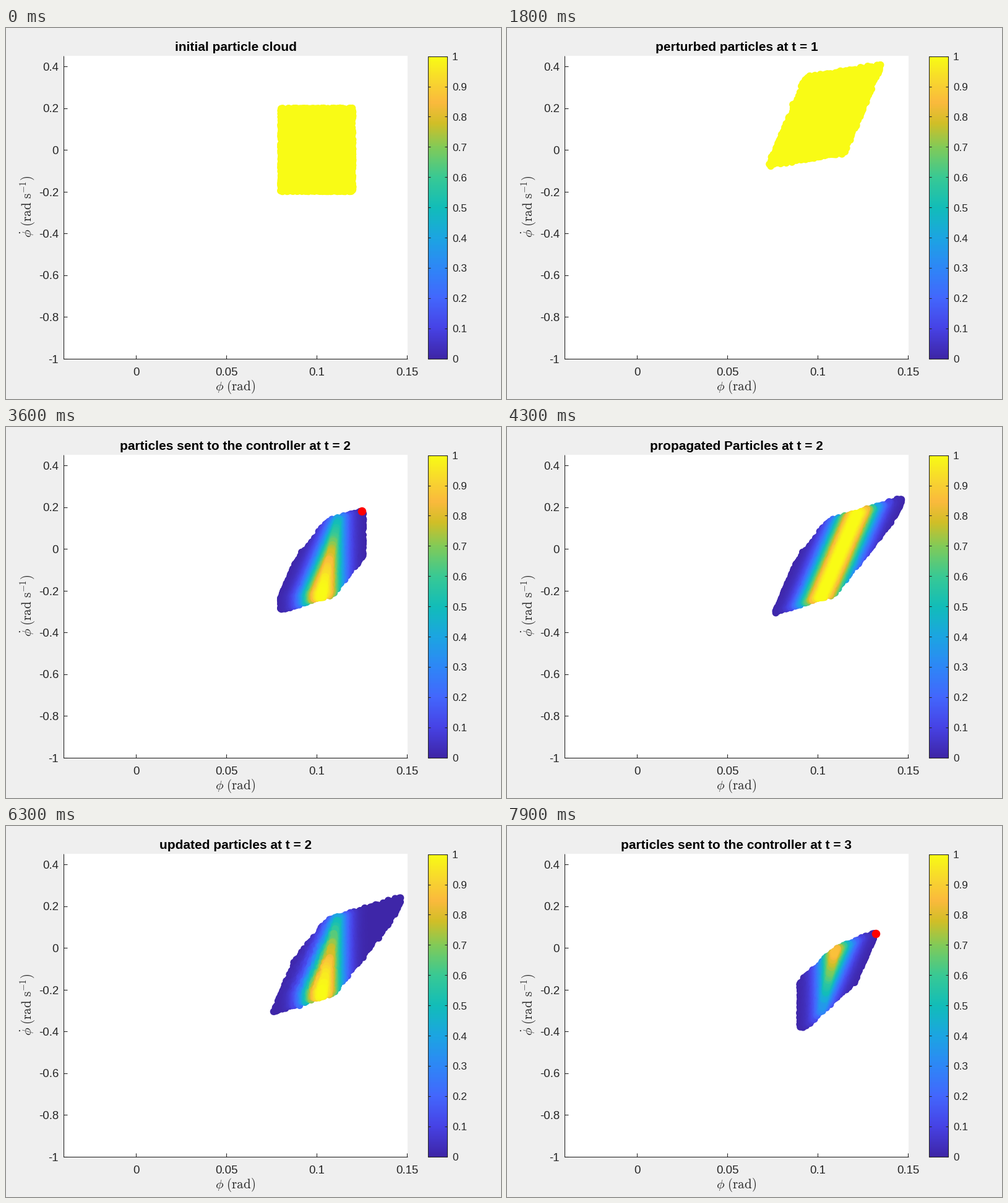
These frames come from a looping animation (800 px wide and 600 px high, 8000 ms). A matplotlib script:

```python
import numpy as np
import matplotlib.pyplot as plt
from matplotlib.animation import FuncAnimation
from matplotlib.colors import LinearSegmentedColormap
from matplotlib.patches import Rectangle

plt.rcParams["font.family"] = "Liberation Sans"
plt.rcParams["mathtext.fontset"] = "cm"

W, H, DPI = 800, 600, 100
LEFT, RIGHT, TOP, BOTTOM = 93, 648.5, 45, 534.6
BAR_LEFT, BAR_RIGHT, BAR_TOP = 682.4, 713.4, 45.6
INK = "#262626"
PARULA = LinearSegmentedColormap.from_list("parula", [
    (0, "#3e26a8"), (.1, "#4743e6"), (.2, "#4367fd"), (.3, "#2e87f7"),
    (.4, "#1ca5e2"), (.5, "#12bdb9"), (.6, "#38c995"), (.7, "#81cb59"),
    (.78, "#d1bf27"), (.85, "#fbba3d"), (.92, "#f8d62f"), (1, "#f9fb15")])


def pt(px):
    return px * 72 / DPI


def to_px(phi, rate):
    return 210 + 2923 * phi, 197 - 337.5 * rate


# Particle filter, with positions kept in stage pixels
rng = np.random.default_rng(4)


def propagate(pos, shift):
    return pos @ np.array([[1.03, -.17], [-.45, 1.05]]) + shift


def perturb(pos):
    return pos + rng.normal(0, 1.1, pos.shape)


def likelihood(pos, center):
    return np.exp(-(pos[:, 0] - center) ** 2 / 866)


def supported(pos, center):
    return abs(pos[:, 0] - center) < 67


stages = []


def show(frames, title, pos, weight, mark=False):
    order = np.argsort(weight, kind="stable")
    worst = pos[np.argmax(pos[:, 0] - pos[:, 1])] if mark else None
    stages.extend([(title, pos[order], PARULA(weight[order]), worst)] * frames)


N = 6000
pos = np.column_stack(to_px(rng.uniform(.08, .12, N), rng.uniform(-.2, .2, N)))
weight = prior = np.ones(N)
show(6, "initial particle cloud", pos, weight)

steps = [  # drift, measured position
    ((85.5, 19.3), 525.8),
    ((57.7, 151), 510.5),
    ((63, 128), 540)]
for t, (shift, center) in enumerate(steps, 1):
    pos = propagate(pos, shift)
    if t > 1:
        keep = supported(pos, center)
        predicted = np.minimum(prior, likelihood(pos, center))
        show(9, f"particles sent to the controller at t = {t}",
             pos[keep], predicted[keep], mark=True)
    if t == len(steps):
        break
    show(7, f"propagated Particles at t = {t}", pos, weight)
    pos = perturb(pos)
    show(7, f"perturbed particles at t = {t}", pos, weight)
    current = likelihood(pos, center)
    weight = np.minimum(prior, current)
    show(7, f"updated particles at t = {t}", pos, weight)
    keep = supported(pos, center)
    pos, weight, prior = pos[keep], weight[keep], current[keep]
    show(7, f"particles after resampling at t = {t}", pos, weight)

# Stage
fig = plt.figure(figsize=(W / DPI, H / DPI), dpi=DPI, facecolor="#efefef")
ax = fig.add_axes([0, 0, 1, 1])
ax.axis("off")


def line(x, y):
    ax.plot(x, y, color=INK, lw=pt(1.1), solid_capstyle="butt", zorder=5)


def label(x, y, text, px, **kw):
    kw = {"color": INK, "ha": "center", "va": "baseline", **kw}
    return ax.text(x, y, text, fontsize=pt(px), **kw)


ax.add_patch(Rectangle((LEFT, TOP), RIGHT - LEFT, BOTTOM - TOP, fc="white", lw=0))
line([LEFT, LEFT, RIGHT], [TOP, BOTTOM, BOTTOM])
for phi in (0, .05, .1, .15):
    x, _ = to_px(phi, 0)
    line([x, x], [BOTTOM, BOTTOM - 5.5])
    label(x, 561.5, f"{phi:g}", 18.7)
for rate in (.4, .2, 0, -.2, -.4, -.6, -.8, -1):
    _, y = to_px(0, rate)
    line([LEFT, LEFT + 5.5], [y, y])
    label(85, y + 7, f"{rate:g}", 18.7, ha="right")
label(371, 586, r"$\phi\ \mathrm{(rad)}$", 21)
label(50, 289, r"$\dot{\phi}\ \mathrm{(rad\ s}^{-1}\mathrm{)}$", 21,
      rotation=90, ha="right", va="center")

ax.imshow(np.linspace(1, 0, 256)[:, None], cmap=PARULA, aspect="auto",
          extent=(BAR_LEFT, BAR_RIGHT, BOTTOM, BAR_TOP), zorder=2)
line([BAR_LEFT, BAR_RIGHT, BAR_RIGHT, BAR_LEFT, BAR_LEFT],
     [BAR_TOP, BAR_TOP, BOTTOM, BOTTOM, BAR_TOP])
for i in range(11):
    y = BOTTOM + (BAR_TOP - BOTTOM) * i / 10
    line([BAR_RIGHT - 4, BAR_RIGHT], [y, y])
    line([BAR_LEFT, BAR_LEFT + 4], [y, y])
    label(721, y + 6.5, f"{i / 10:g}", 17.3, ha="left")

title = label(371, 37, "", 20.9, weight="bold", color="black")
cloud = ax.scatter([], [], s=pt(11.6) ** 2, linewidths=0, zorder=3)
dot, = ax.plot([], [], "o", color="red", ms=pt(13.5), mew=0, zorder=4)
ax.set(xlim=(0, W), ylim=(H, 0))


def draw(frame):
    text, points, colors, worst = stages[frame]
    title.set_text(text)
    cloud.set_offsets(points)
    cloud.set_facecolors(colors)
    dot.set_data(([], []) if worst is None else ([worst[0]], [worst[1]]))
    return title, cloud, dot


anim = FuncAnimation(fig, draw, frames=len(stages), interval=100,
                     repeat=True, repeat_delay=0)
plt.show()
```
